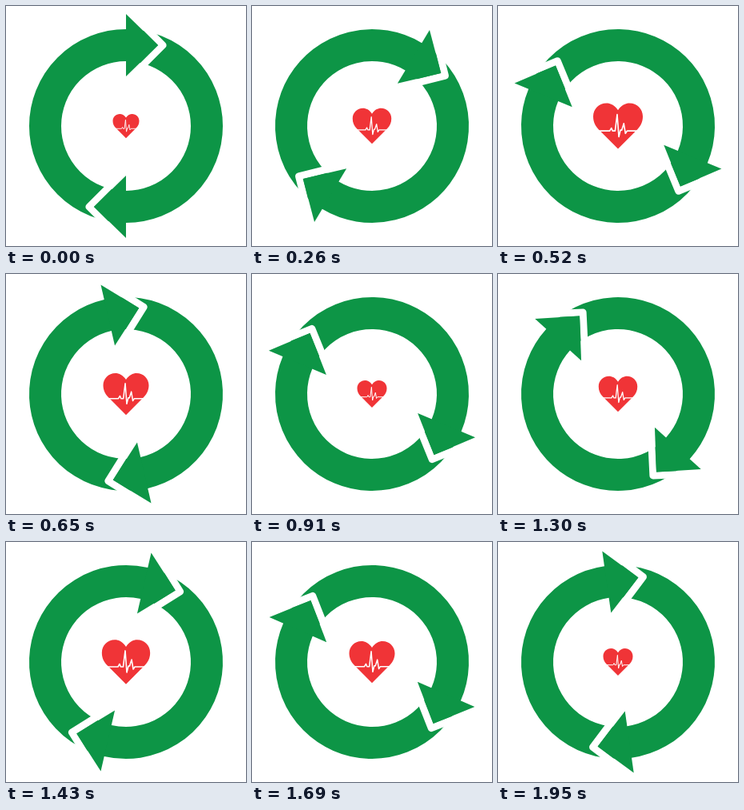
An HTML page that plays this animation: 300 by 300 pixels, repeating every 2.08 s.

```html
<!DOCTYPE html>
<html lang="en">
<head>
<meta charset="utf-8">
<title>Heart cycle</title>
<style>
  html, body { margin: 0; width: 100%; height: 100%; overflow: hidden; background: #fff; }
  svg { display: block; width: 100vw; height: 100vh; }
</style>
</head>
<body>
<svg viewBox="0 0 300 300">
  <defs>
    <!-- white gap followed by the arrowhead that sits in it -->
    <g id="head">
      <path d="M6.2 -141 L46.2 -101 L6.2 -61" fill="none" stroke="#fff" stroke-width="8.8" stroke-linejoin="round"/>
      <path d="M0 -140 L40 -101 L0 -62 Z" fill="#0d9546"/>
    </g>
  </defs>
  <rect width="300" height="300" fill="#fff"/>
  <g id="wheel">
    <circle r="101" fill="none" stroke="#0d9546" stroke-width="40"/>
    <use href="#head"/>
    <use href="#head" transform="rotate(180)"/>
  </g>
  <g id="heart">
    <path fill="#f03437" d="M0 -19 C-4 -25 -9 -27.5 -14 -27.5 C-23 -27.5 -30 -20.5 -30 -11.5 C-30 -5 -27.5 0 -23.5 4 L0 27.5 L23.5 4 C27.5 0 30 -5 30 -11.5 C30 -20.5 23 -27.5 14 -27.5 C9 -27.5 4 -25 0 -19 Z"/>
    <path fill="none" stroke="#fff" stroke-width="1.6" stroke-linejoin="round" d="M-27 6 H-10 L-8 2.5 L-6.5 6 H-3.5 L-1 -14 L1 13 L3 5 H4.5 L7 -3 L9 9 L11 6 H27"/>
  </g>
</svg>
<script>
  const STEP = 130, STEPS = 16, TURN = 720;
  const BEAT = [33, 38, 48.5, 60.3, 62, 57, 47, 37]; // heart width through one beat
  const wheel = document.getElementById("wheel");
  const heart = document.getElementById("heart");
  const smooth = x => x * x * (3 - 2 * x);

  function draw(ms) {
    const n = Math.floor(ms / STEP) % STEPS;
    const angle = TURN * smooth(n / STEPS);
    const scale = BEAT[n % BEAT.length] / 60;
    wheel.setAttribute("transform", `translate(150 150) rotate(${angle})`);
    heart.setAttribute("transform", `translate(150 150) scale(${scale})`);
  }

  const start = performance.now();
  function tick() {
    draw(performance.now() - start);
    requestAnimationFrame(tick);
  }
  tick();
</script>
</body>
</html>
```
